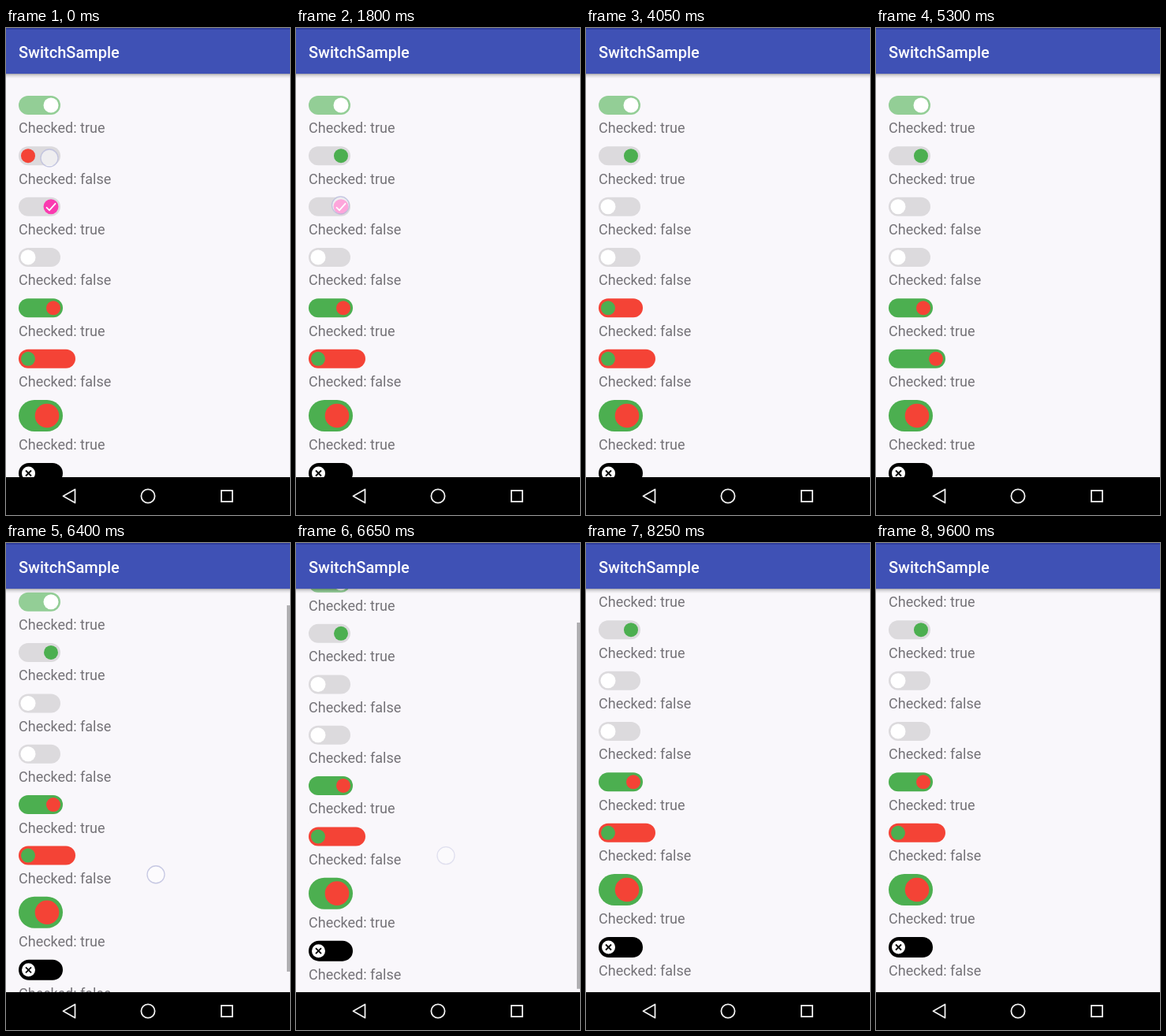
An HTML page that plays this animation: 360x618 px, repeating every 9.65 s.

```html
<!DOCTYPE html>
<html lang="en">
<head>
<meta charset="utf-8">
<title>SwitchSample</title>
<style>
html, body { margin: 0; width: 100%; height: 100%; overflow: hidden; background: #f9f7fb; }
svg { display: block; width: 100vw; height: 100vh; }
text { font-family: Roboto, sans-serif; font-size: 18px; fill: #757378; }
.title { font-size: 20px; font-weight: 500; fill: #fff; }
</style>
</head>
<body>
<svg id="stage" viewBox="0 0 360 618">
  <defs>
    <clipPath id="viewport"><rect y="58" width="360" height="512"/></clipPath>
    <linearGradient id="shade" x2="0" y2="1">
      <stop stop-color="#000" stop-opacity=".32"/>
      <stop offset=".4" stop-color="#000" stop-opacity=".12"/>
      <stop offset="1" stop-color="#000" stop-opacity="0"/>
    </linearGradient>
  </defs>
  <rect width="360" height="618" fill="#f9f7fb"/>
  <g clip-path="url(#viewport)">
    <g id="list"></g>
    <rect id="bar" x="356" width="4" fill="#b0afb2"/>
  </g>
  <rect y="58" width="360" height="6" fill="url(#shade)"/>
  <rect width="360" height="58" fill="#3f51b5"/>
  <rect width="360" height="2" fill="#303f9f"/>
  <text class="title" x="16" y="38">SwitchSample</text>
  <rect y="570" width="360" height="48"/>
  <g fill="none" stroke="#f0f0f0" stroke-width="1.8" stroke-linejoin="round">
    <path d="M72.5 594L87.5 585.5V602.5Z"/>
    <circle cx="180" cy="594" r="8.6"/>
    <rect x="273" y="587" width="14" height="14" stroke-linejoin="miter"/>
  </g>
  <circle id="touch" r="11" fill="#fff" fill-opacity=".55" stroke="#b9bbdc" stroke-opacity=".8" stroke-width="1.3"/>
</svg>
<script>
const LOOP = 9650, TICK = 50, SLIDE = 200;
const VIEW_TOP = 58, VIEW_HEIGHT = 512, SCROLL_MAX = 52;
const GREEN = [76, 175, 80], RED = [244, 67, 54], WHITE = [255, 255, 255];
const GREY = [220, 218, 221], SOFT_GREEN = [147, 206, 150], PINK = [250, 58, 176], BLACK = [0, 0, 0];

// Each colour pair is [off, on]; left and right are the thumb centres.
const small = { w: 53, h: 24, left: 28, right: 57, r: 9.5, track: [GREY, SOFT_GREEN], thumb: [WHITE, WHITE] };
const bold = { ...small, w: 56, right: 60, r: 9, track: [RED, GREEN], thumb: [GREEN, RED] };
const rows = [
  { ...small, y: 98, on: true },
  { ...small, y: 162.2, r: 9, track: [GREY, GREY], thumb: [RED, GREEN] },
  { ...small, y: 226.8, on: true, track: [GREY, GREY], thumb: [WHITE, PINK], check: "#fff" },
  { ...small, y: 291 },
  { ...bold, y: 355.3, on: true },
  { ...bold, y: 419.8, w: 72, right: 76 },
  { ...bold, y: 492, h: 40, left: 36, right: 52, r: 15.3, on: true },
  { ...bold, y: 565, h: 26, left: 28.5, right: 59.5, r: 8.5, track: [BLACK, BLACK], thumb: [WHITE, WHITE], check: "#000", cross: "#000" }
];
const baselines = [133.4, 197.7, 262.1, 326.4, 390.8, 455.1, 535.3, 601];

const taps = [
  { row: 1, down: 0, up: 950, x: 55, y: 165 },
  { row: 2, down: 1800, up: 1800, x: 56.5, y: 225 },
  { row: 3, down: 2600, up: 2600, x: 55, y: 291 },
  { row: 3, down: 3200, up: 3250, x: 55, y: 291 },
  { row: 4, down: 3800, up: 3850, x: 55, y: 355 },
  { row: 4, down: 4450, up: 4550, x: 55, y: 355 },
  { row: 5, down: 5050, up: 5100, x: 55, y: 420 },
  { row: 5, down: 5700, up: 5750, x: 55, y: 420 },
  { row: 6, down: 7300, up: 7400, x: 54, y: 431 },
  { row: 6, down: 8000, up: 8050, x: 54, y: 431 },
  { row: 7, down: 8700, up: 8750, x: 54, y: 511 },
  { row: 7, down: 9350, up: 9400, x: 54, y: 511 }
];
const drag = { down: 6250, start: 6280, up: 6600, settle: 6950, x: 190, y: 444 };

const byId = id => document.getElementById(id);
const clamp = v => Math.max(0, Math.min(1, v));
const smooth = v => (1 - Math.cos(Math.PI * v)) / 2;
const mix = ([a, b], p) => `rgb(${a.map((v, i) => Math.round(v + (b[i] - v) * p))})`;

function set(node, attrs) {
  for (const key in attrs) node.setAttribute(key, attrs[key]);
  return node;
}

function add(parent, tag, attrs) {
  return parent.appendChild(set(document.createElementNS("http://www.w3.org/2000/svg", tag), attrs));
}

function icon(parent, d, stroke) {
  return add(parent, "path", { d, stroke: stroke || "none", fill: "none", "stroke-width": 1.8 });
}

rows.forEach((row, i) => {
  const list = byId("list");
  row.back = add(list, "rect", { x: 16, y: row.y - row.h / 2, width: row.w, height: row.h, rx: row.h / 2 });
  row.knob = add(list, "g", {});
  row.disc = add(row.knob, "circle", { r: row.r });
  row.tick = icon(row.knob, "M-6 .5L-2 4.5L6 -4.5", row.check);
  row.ex = icon(row.knob, "M-3.5 -3.5L3.5 3.5M3.5 -3.5L-3.5 3.5", row.cross);
  row.label = add(list, "text", { x: 16, y: baselines[i] });
});

function switchState(index, t) {
  let on = !!rows[index].on, p = +on;
  for (const tap of taps) {
    if (tap.row !== index || t < tap.up) continue;
    on = !on;
    const k = smooth(clamp((t - tap.up) / SLIDE));
    p = on ? k : 1 - k;
  }
  return { on, p };
}

function drawRow(row, index, t) {
  const { on, p } = switchState(index, t);
  set(row.back, { fill: mix(row.track, p) });
  set(row.knob, { transform: `translate(${row.left + (row.right - row.left) * p} ${row.y})` });
  set(row.disc, { fill: mix(row.thumb, p) });
  set(row.tick, { opacity: p });
  set(row.ex, { opacity: 1 - p });
  row.label.textContent = `Checked: ${on}`;
}

function drawTouch(t, scroll) {
  const press = [...taps, drag].find(e => t >= e.down && t < e.up + 100);
  set(byId("touch"), press ? {
    cx: press.x,
    cy: press === drag ? drag.y - scroll : press.y,
    opacity: 1 - clamp((t - press.up) / 100)
  } : { opacity: 0 });
}

function render(t) {
  const u = clamp((t - drag.start) / (drag.settle - drag.start));
  const scroll = SCROLL_MAX * (1 - (1 - u) ** 3);
  const ratio = VIEW_HEIGHT / (VIEW_HEIGHT + SCROLL_MAX);
  rows.forEach((row, i) => drawRow(row, i, t));
  set(byId("list"), { transform: `translate(0 ${-scroll})` });
  set(byId("bar"), {
    y: VIEW_TOP + scroll * ratio,
    height: VIEW_HEIGHT * ratio,
    opacity: t < drag.start ? 0 : 1 - clamp((t - 7250) / 230)
  });
  drawTouch(t, scroll);
}

const began = performance.now();
function frame() {
  const t = (performance.now() - began) % LOOP;
  render(Math.floor(t / TICK) * TICK);
  requestAnimationFrame(frame);
}
frame();
</script>
</body>
</html>
```
